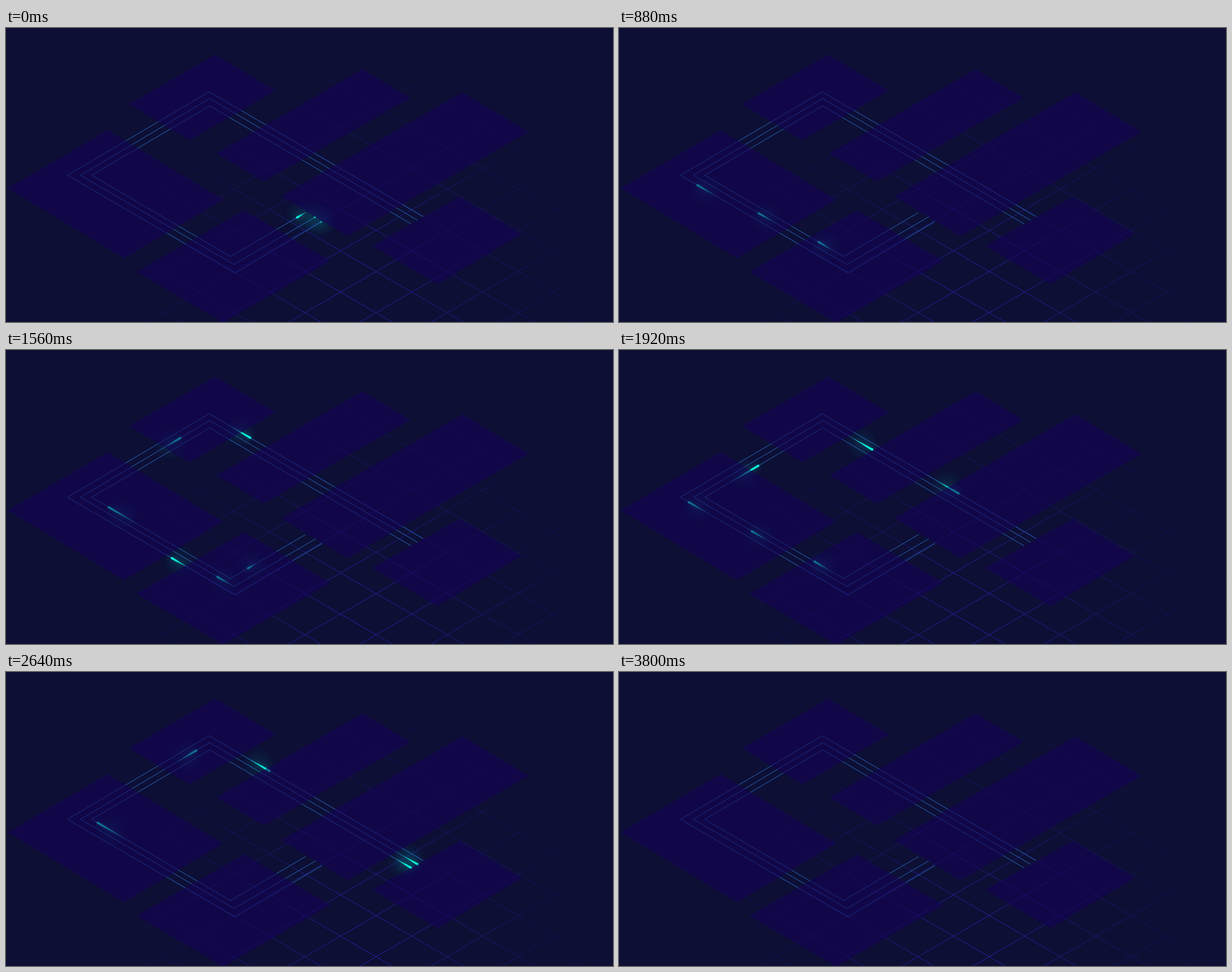
Write an HTML page with a canvas that moves like this. It is 1076x521 px and loops after 4.16 s.

```html
<!DOCTYPE html>
<html lang="en">
<head>
<meta charset="utf-8">
<title>Light circuits</title>
<style>
  html, body { margin: 0; width: 100%; height: 100%; overflow: hidden; background: #0d0f35; }
  svg, canvas { position: absolute; left: 0; top: 0; width: 1076px; height: 521px; }
  canvas { filter: drop-shadow(0 0 5px rgba(0, 255, 220, .4)); }
  #grid { stroke: #26219b; stroke-width: 1.2; }
  #wires { fill: none; stroke: #2768b8; stroke-width: 1; }
  #tiles { fill: #140058; fill-opacity: .55; }
</style>
</head>
<body>
<svg viewBox="0 0 1076 521">
  <defs>
    <radialGradient id="fade" gradientUnits="userSpaceOnUse" cx="0" cy="0" r="1"
      gradientTransform="translate(630 480) scale(455 445)">
      <stop offset="0" stop-color="#fff" stop-opacity=".85"/>
      <stop offset=".3" stop-color="#fff" stop-opacity=".6"/>
      <stop offset=".6" stop-color="#fff" stop-opacity=".34"/>
      <stop offset="1" stop-color="#fff" stop-opacity="0"/>
    </radialGradient>
    <mask id="spot" maskUnits="userSpaceOnUse" x="0" y="0" width="1076" height="521">
      <rect width="1076" height="521" fill="url(#fade)"/>
    </mask>
  </defs>
  <g mask="url(#spot)"><path id="grid"/></g>
  <path id="wires"/>
</svg>
<canvas width="1076" height="521"></canvas>
<svg viewBox="0 0 1076 521">
  <g id="tiles">
    <path d="M218 135 371 47 478 111 325 199Z"/>
    <path d="M3 284 180 181 385 304 209 408Z"/>
    <path d="M373 222 632 73 717 124 457 272Z"/>
    <path d="M488 298 809 114 926 184 605 369Z"/>
    <path d="M231 432 422 323 575 413 385 522Z"/>
    <path d="M649 386 804 299 914 365 765 454Z"/>
  </g>
</svg>
<script>
const LOOP = 4160, STEP = 40, WAVES = [0, 1010], SLICES = 18;

// pts: corners of the wire; keys: [ms, distance along x]; tail: length at a distance
const wires = [
  {
    pts: [[560, 343], [406, 434], [109, 261], [360, 113], [739, 334]],
    keys: [[0, 2], [550, 266], [880, 421], [1560, 775], [1920, 944], [2150, 1088]],
    tail: d => 22 + .02 * d
  },
  {
    pts: [[550, 334], [404, 419], [132, 261], [361, 125], [730, 341]],
    keys: [[0, 3], [550, 175], [880, 302], [1560, 595], [1920, 735], [2150, 848], [2640, 1031]],
    tail: d => 20 + .022 * d
  },
  {
    pts: [[531, 327], [398, 405], [152, 261], [361, 138], [718, 347]],
    keys: [[0, 15], [550, 102], [880, 177], [1560, 349], [1920, 474], [2150, 657], [2390, 800], [2640, 967]],
    tail: d => Math.min(50, Math.max(15, .145 * d))
  }
];

const span = (a, b) => Math.abs(b[0] - a[0]);
for (const w of wires)
  w.len = w.pts.slice(1).reduce((sum, p, i) => sum + span(w.pts[i], p), 0);

document.getElementById('wires').setAttribute('d',
  wires.map(w => 'M' + w.pts.join(' ')).join(''));

let grid = '';
const slope = .5794;
for (let k = -14; k <= 14; k++) {
  const down = 124.4 + 73 * k, up = 811.6 + 73 * k;
  grid += `M0 ${down}L1076 ${down + slope * 1076}M0 ${up}L1076 ${up - slope * 1076}`;
}
document.getElementById('grid').setAttribute('d', grid);

// Smooth curve through the keys, straight beyond both ends
function distance(keys, t) {
  const last = keys.length - 1;
  const rate = (a, b) => (keys[b][1] - keys[a][1]) / (keys[b][0] - keys[a][0]);
  const tangent = i => rate(Math.max(0, i - 1), Math.min(last, i + 1));
  if (t <= 0) return keys[0][1] + t * rate(0, 1);
  if (t >= keys[last][0]) return keys[last][1] + (t - keys[last][0]) * rate(last - 1, last);
  const i = keys.findIndex(k => k[0] > t) - 1;
  const [t0, d0] = keys[i], [t1, d1] = keys[i + 1];
  const h = t1 - t0, u = (t - t0) / h, v = 1 - u;
  return d0 * (1 + 2 * u) * v * v + d1 * u * u * (3 - 2 * u)
    + h * u * v * (tangent(i) * v - tangent(i + 1) * u);
}

function place(pts, d) {
  for (let i = 1; i < pts.length; i++) {
    const a = pts[i - 1], b = pts[i], s = span(a, b);
    if (d <= s || i === pts.length - 1) {
      const u = d / s;
      return [a[0] + (b[0] - a[0]) * u, a[1] + (b[1] - a[1]) * u];
    }
    d -= s;
  }
}

const ctx = document.querySelector('canvas').getContext('2d');

function comet(w, t) {
  const d = distance(w.keys, t);
  if (d <= 0) return;
  const head = Math.min(d, w.len), end = Math.max(0, d - w.tail(d));
  if (end >= head) return;

  const [hx, hy] = place(w.pts, head);
  const [gx, gy] = place(w.pts, (head + end) / 2);
  const glow = ctx.createRadialGradient(gx, gy, 0, gx, gy, 32);
  glow.addColorStop(0, 'rgba(0,255,220,.07)');
  glow.addColorStop(1, 'rgba(0,255,220,0)');
  ctx.fillStyle = glow;
  ctx.fillRect(gx - 32, gy - 32, 64, 64);

  const size = Math.min(1, .4 + head / 20);
  let from = place(w.pts, end);
  for (let i = 1; i <= SLICES; i++) {
    const u = i / SLICES, to = place(w.pts, end + (head - end) * u);
    ctx.strokeStyle = `rgba(10,255,225,${Math.min(1, u * 1.35)})`;
    ctx.lineWidth = (.8 + 3 * u) * size;
    ctx.beginPath();
    ctx.moveTo(...from);
    ctx.lineTo(...to);
    ctx.stroke();
    from = to;
  }
  ctx.fillStyle = '#0affe1';
  ctx.beginPath();
  ctx.arc(hx, hy, 1.9 * size, 0, 7);
  ctx.fill();
}

const start = performance.now();
function draw() {
  const now = (performance.now() - start) % LOOP;
  const t = Math.floor(now / STEP) * STEP;
  ctx.clearRect(0, 0, 1076, 521);
  for (const offset of WAVES)
    for (const w of wires) comet(w, t - offset);
  requestAnimationFrame(draw);
}
draw();
</script>
</body>
</html>
```
